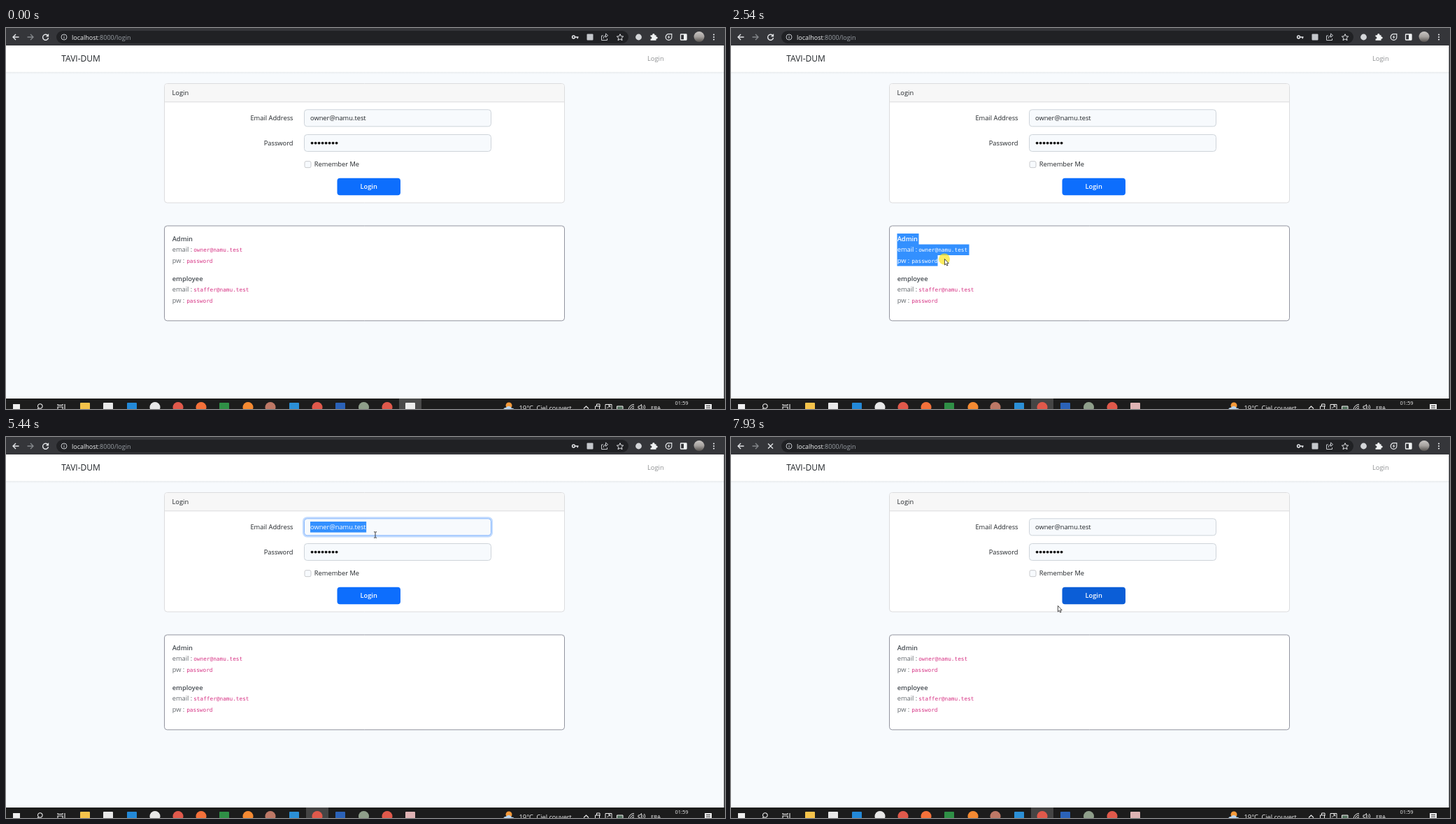
An HTML page with a canvas that plays this animation: 1028 by 545 pixels, repeating every 8000 ms.

```html
<!DOCTYPE html>
<html lang="en">
<head>
<meta charset="utf-8">
<title>Login form demo</title>
<style>
html, body { margin: 0; width: 100%; height: 100%; overflow: hidden; background: #f7fafd; }
canvas { display: block; }
</style>
</head>
<body>
<canvas id="stage" width="1028" height="545"></canvas>
<script>
const ctx = document.getElementById('stage').getContext('2d');
const LOOP = 8000;
const SANS = '"Open Sans", "Noto Sans", sans-serif';
const MONO = '"DejaVu Sans Mono", "Liberation Mono", monospace';
const BODY = '9.3px ' + SANS;
const BOLD = '600 9.3px ' + SANS;
const CODE = '7.75px ' + MONO;
const BLUE = '#3390ff';
const INK = '#212529';
const EMAIL = 'owner@namu.test';

// Stepped mouse moves: start, end, number of steps, [progress, x, y] stops.
const MOVES = [
  { a: 70, b: 520, n: 8, path: [[0, 584, 552], [1, 505, 368]] },
  { a: 730, b: 1520, n: 12, path: [[0, 505, 368], [0.75, 205, 326], [1, 239, 301]] },
  { a: 2320, b: 2750, n: 7, path: [[0, 239, 301], [0.57, 305, 330], [1, 311, 329]] },
  { a: 2950, b: 3010, n: 2, path: [[0, 311, 329], [1, 322, 346]] },
  { a: 3160, b: 3760, n: 10, path: [[0, 322, 346], [0.4, 312, 317], [1, 312, 317]] },
  { a: 3960, b: 4710, n: 12, path: [[0, 312, 317], [1, 525, 131]] },
  { a: 4770, b: 5110, n: 6, path: [[0, 525, 131], [0.7, 525, 131], [1, 528, 139]] },
  { a: 5440, b: 6070, n: 10, path: [[0, 528, 139], [0.1, 528, 140], [0.5, 527, 165], [1, 529, 168]] },
  { a: 6310, b: 6800, n: 8, path: [[0, 529, 168], [0.125, 530, 197], [0.4, 532, 227], [1, 532, 227]] },
  { a: 7790, b: 7930, n: 3, path: [[0, 532, 227], [1, 467, 241]] }
];
const [, , DRAG, , PICK, , FOCUS_EMAIL, FOCUS_PW, SUBMIT] = MOVES;

function progress({ a, b, n }, t) {
  if (t < a) return 0;
  return Math.min(1, (Math.floor((t - a) / (b - a) * (n - 1) + 1e-6) + 1) / n);
}

function along(path, p) {
  const i = Math.max(1, path.findIndex(stop => stop[0] >= p));
  const [p0, x0, y0] = path[i - 1], [p1, x1, y1] = path[i];
  const k = (p - p0) / (p1 - p0);
  return { x: x0 + (x1 - x0) * k, y: y0 + (y1 - y0) * k };
}

function mouseAt(t) {
  const move = MOVES.filter(m => t >= m.a).pop() || MOVES[0];
  return along(move.path, progress(move, t));
}

function stateAt(t) {
  const drag = progress(DRAG, t), pick = progress(PICK, t);
  const email = progress(FOCUS_EMAIL, t), pw = progress(FOCUS_PW, t), submit = progress(SUBMIT, t);
  return {
    mouse: mouseAt(t), drag, submit,
    dragSelect: drag > 0 && pick < 0.5,
    lineSelect: pick >= 0.8 && email === 0,
    emailFocus: email > 0 && pw < 0.5,
    emailSelect: email >= 0.66 && pw < 0.5,
    pwFocus: pw >= 0.5 && submit < 0.6,
    pwSelect: pw >= 0.8 && submit < 0.6,
    caret: t >= 1730 && t < 1792,
    switched: t >= 1792,
    recording: t >= 70,
    hover: submit >= 0.4,
    loading: submit >= 0.75,
    pressed: (t >= 1730 && drag < 0.8) || (pick >= 0.4 && pick < 0.85) ||
      (email > 0 && email < 0.8) || (pw >= 0.5 && pw < 0.9) || (submit >= 0.5 && submit < 0.8)
  };
}

function rect(x, y, w, h, fill) {
  ctx.fillStyle = fill;
  ctx.fillRect(x, y, w, h);
}

function box(x, y, w, h, r, fill, line, lw = 1) {
  ctx.beginPath();
  ctx.roundRect(x, y, w, h, r);
  if (fill) { ctx.fillStyle = fill; ctx.fill(); }
  if (line) { ctx.strokeStyle = line; ctx.lineWidth = lw; ctx.stroke(); }
}

function dot(x, y, r, fill) {
  ctx.beginPath();
  ctx.arc(x, y, r, 0, Math.PI * 2);
  ctx.fillStyle = fill;
  ctx.fill();
}

function text(s, x, y, fill = INK, font = BODY, align = 'left') {
  ctx.font = font;
  ctx.fillStyle = fill;
  ctx.textAlign = align;
  ctx.fillText(s, x, y);
}

// Line icon centred at x, y; fill is optional.
function icon(d, x, y, line, lw = 1.2, fill) {
  const path = new Path2D(d);
  ctx.save();
  ctx.translate(x, y);
  if (fill) { ctx.fillStyle = fill; ctx.fill(path); }
  if (line) { ctx.strokeStyle = line; ctx.lineWidth = lw; ctx.stroke(path); }
  ctx.restore();
}

function drawToolbar(s) {
  const pale = '#e3e5e8', soft = '#c4c7cb';
  rect(0, 0, 1028, 25, '#35363a');
  box(72, 4, 818, 18, 9, '#202124');
  icon('M4.5 0H-4M0 -4L-4 0L0 4', 14, 13, pale, 1.4);
  icon('M-4.5 0H4M0 -4L4 0L0 4', 35, 13, '#85888c', 1.3);
  if (s.loading) icon('M-3.5 -3.5L3.5 3.5M3.5 -3.5L-3.5 3.5', 56.5, 13, pale, 1.4);
  else {
    icon('M3.4 -2A4 4 0 1 0 4 1', 56.5, 13, pale, 1.4);
    icon('M4.6 -5V-.6H.4Z', 56.5, 13, null, 1, pale);
  }
  icon('M4 0A4 4 0 1 1 -4 0A4 4 0 1 1 4 0M0 -.6V2.3M0 -2.4V-1.4', 83, 13, soft, 1);
  text('localhost', 94, 16.5, '#f1f3f4', '9px ' + SANS);
  text(':8000/login', 94 + ctx.measureText('localhost').width, 16.5, '#9aa0a6', '9px ' + SANS);
  icon('M-.6 0A1.9 1.9 0 1 1 -4.4 0A1.9 1.9 0 1 1 -.6 0M-.6 0H4.5M3.2 0V2.2', 814, 13, pale, 1.5);
  box(830.5, 8.5, 9, 9, 1, soft);
  icon('M-2 -2H-4.5V4.5H3.5V2M-2 2Q-1.5 -2 2 -2.3M1.5 -5L4.7 -2.3L1.5 .4Z', 856, 13, soft, 1);
  icon('M0 -4.6L1.4 -1.5L4.7 -1.2L2.2 1L3 4.3L0 2.6L-3 4.3L-2.2 1L-4.7 -1.2L-1.4 -1.5Z', 878, 13.3, pale, 1);
  dot(904.5, 13, 4.4, '#d4d6d9');
  icon('M-4.5 -2.5H-1.8A1.7 1.7 0 1 1 1.4 -2.5H3.5V-.3A1.6 1.6 0 1 1 3.5 2.7V5H-4.5V2.7A1.5 1.5 0 1 0 -4.5 -.2Z', 926, 12.8, null, 1, '#f1f3f4');
  icon('M4.3 0A4.3 4.3 0 1 1 -4.3 0A4.3 4.3 0 0 1 0 -4.3H4.3Z', 947.5, 13, pale, 1.2);
  icon('M1 -3L-2 .6H0L-.8 3L2.2 -.6H.2Z', 947.5, 13, null, 1, pale);
  box(964.5, 9, 8.5, 8, 0.5, null, '#f1f3f4', 1.3);
  rect(969, 9, 4, 8, '#f1f3f4');
  const g = ctx.createLinearGradient(0, 5, 0, 20);
  g.addColorStop(0, '#c9c6c4');
  g.addColorStop(0.5, '#a5a19e');
  g.addColorStop(1, '#55524f');
  dot(991, 12.5, 7.5, g);
  for (let i = -1; i < 2; i++) dot(1012, 13 + i * 3.5, 1.1, pale);
}

function drawField(y, focused) {
  if (focused) box(425.3, y - 1.3, 269.4, 26.6, 5, null, '#c2dbfe', 2.7);
  box(426.5, y, 267, 24, 4, '#f7fafd', focused ? '#86b7fe' : '#ced4da');
}

function drawForm(s) {
  box(226.5, 79.5, 572, 170.5, 4, '#fff', '#dcdcde');
  box(227, 80, 571, 26, [3.5, 3.5, 0, 0], '#f7f7f7');
  rect(227, 105.3, 571, 1, '#dcdcde');
  text('Login', 237.5, 95.5);
  text('Email Address', 410.5, 132, INK, BODY, 'right');
  text('Password', 410.5, 168, INK, BODY, 'right');

  drawField(116.8, s.emailFocus);
  ctx.font = BODY;
  if (s.emailSelect) rect(435, 121, ctx.measureText(EMAIL).width + 0.5, 15.5, BLUE);
  text(EMAIL, 435, 132, s.emailSelect ? '#fff' : INK);

  drawField(152.5, s.pwFocus);
  if (s.pwSelect) rect(435, 156.5, 40.5, 15.5, BLUE);
  for (let i = 0; i < 8; i++) dot(437.6 + i * 5, 164.6, 1.9, s.pwSelect ? '#fff' : '#111');
  if (s.caret) rect(475, 157.5, 1, 13, '#222');

  box(427, 190.7, 9, 9, 2, '#f7fafd', '#c3c5c8', 0.9);
  text('Remember Me', 440.8, 198.4);
  box(473.5, 214.8, 90.5, 24.4, 4, s.hover ? '#0b5ed7' : '#0d6efd');
  text('Login', 518.6, 230.4, '#fff', BOLD, 'center');
}

function drawAccount(name, mail, y, color) {
  text(name, 237.7, y, color || '#454b51', BOLD);
  text('email :', 237.7, y + 15.6, color || '#62676c');
  text(mail, 268.2, y + 15.6, color || '#d63384', CODE);
  text('pw :', 237.7, y + 31.2, color || '#62676c');
  text('password', 258.2, y + 31.2, color || '#d63384', CODE);
}

// Selected rows grow with the drag, then one row is picked on its own.
function selection(s) {
  if (s.lineSelect) return [[237.5, 309.4, 103, 15.6]];
  if (!s.dragSelect) return [];
  if (s.drag < 0.2) return [[237.5, 294, 12, 15.6]];
  const rows = [[237.5, 294, 31, 15.6]];
  if (s.drag < 0.4) return rows.concat([[237.5, 309.4, 28, 15.6]]);
  return rows.concat([[237.5, 309.4, 103, 15.6], [237.5, 325, s.drag < 0.5 ? 45 : 58, 15.6]]);
}

function drawAccounts(s) {
  box(226.5, 283, 572, 135.8, 4, '#fff', '#92949f');
  drawAccount('Admin', EMAIL, 304.8);
  drawAccount('employee', 'staffer@namu.test', 361.8);
  const rows = selection(s);
  if (!rows.length) return;
  ctx.save();
  ctx.beginPath();
  rows.forEach(r => ctx.rect(...r));
  ctx.fillStyle = BLUE;
  ctx.fill();
  ctx.clip();
  drawAccount('Admin', EMAIL, 304.8, '#fff');
  ctx.restore();
}

function drawPage(s) {
  rect(0, 25, 1028, 505, '#f7fafd');
  const g = ctx.createLinearGradient(0, 62.5, 0, 66);
  g.addColorStop(0, '#e6e9eb');
  g.addColorStop(1, '#f7fafd');
  rect(0, 62.5, 1028, 3.5, g);
  rect(0, 25, 1028, 37.8, '#fff');
  text('TAVI-DUM', 79.3, 48, INK, '12px ' + SANS);
  text('Login', 917, 47.3, '#8e9092');
  drawForm(s);
  drawAccounts(s);
  rect(1026.5, 25, 1.5, 505, '#26272a');
}

function drawTaskbar(s) {
  const white = '#f0f0f0';
  rect(0, 530, 1028, 15, '#1c1c1c');
  if (s.switched) rect(429, 530, 32, 15, '#454545');
  else rect(562, 530, 32, 15, s.recording ? '#3b3b3b' : '#4a4a4a');

  box(10, 538, 10, 10, 0, white);
  icon('M3.6 -.5A3.3 3.3 0 1 1 -3 -.5A3.3 3.3 0 1 1 3.6 -.5M-2 2L-4.5 5', 48.5, 541.5, white, 1.1);
  icon('M-5 -4V-2.5H2V-4M-5 5V0H2V5M5 -4V5', 79, 542, white, 1.1);
  const squares = [[113, '#f5c34b'], [146, '#e9e9e9'], [180, '#2389d8'], [312, '#2f8f46'],
    [412, '#2b8fd6'], [478, '#2b62b8'], [578, s.recording ? '#dfb3b4' : '#ececec']];
  squares.forEach(([x, color]) => box(x - 7, 536, 14, 12, 1, color));
  const circles = [[213, '#e8e8e8'], [246, '#e0594b'], [279, '#f4713a'], [346, '#f58a32'],
    [378, '#bd7866'], [445, '#e0594b'], [511.5, '#8f9f8b'], [545, '#e0594b']];
  circles.forEach(([x, color]) => dot(x, 542.5, 7.5, color));

  dot(719, 540, 4.5, '#f49a3a');
  icon('M-8 4A3.5 3.5 0 0 1 -4 0A4.5 4.5 0 0 1 4 1A3 3 0 0 1 8 4Z', 719, 543, null, 1, '#b9d5ef');
  text('19°C', 733.5, 547, white);
  text('Ciel couvert', 758.5, 547, white, '9.2px ' + SANS);
  icon('M-3.5 2L0 -1.5L3.5 2', 829.5, 542.5, white, 1.1);
  icon('M-3 -1H3V5H-3ZM-1 -1V-4H3.5V0', 845.5, 542, white, 1);
  icon('M-4.5 -3.5H4.5V4H-4.5ZM-2 2L2 -2M-.5 -2H2V.5', 861.5, 542, white, 1);
  icon('M-4.5 -1H4V4H-4.5Z', 878, 542, white, 1, '#52705c');
  icon('M-4 4A8 8 0 0 1 4 -4M-1.5 4A5.5 5.5 0 0 1 4 -1.5M1 4A3 3 0 0 1 4 1', 894, 542.5, white, 1);
  icon('M-5 -1.5H-3L-.5 -4V4L-3 1.5H-5ZM1.5 -2Q3 0 1.5 2M3.5 -3.5Q6 0 3.5 3.5', 909, 542.5, white, 0.9);
  text('FRA', 922, 546, white, '8px ' + SANS);
  text('01:59', 966, 539.4, white, '7.5px ' + SANS, 'center');
  icon('M-5 -4H5V4H1L-1 6V4H-5Z', 1004, 542, null, 1, white);
  icon('M-3 -1.5H3M-3 1.2H3', 1004, 542, '#1c1c1c', 0.9);
}

function drawMouse(s) {
  const { x, y } = s.mouse;
  const inside = (l, t, r, b) => x >= l && x <= r && y >= t && y <= b;
  const overField = inside(427, 117, 693, 141) || inside(427, 152, 693, 177);
  const overText = inside(237, 294, 268, 310) || inside(237, 310, 340, 325) || inside(237, 325, 296, 341);
  const overButton = inside(474, 215, 564, 239);
  if (s.pressed) dot(x, y + (overButton ? 4 : 0.5), 8, 'rgba(250, 228, 20, .68)');
  if (overField || overText) {
    const line = s.lineSelect && overText ? '#fff' : '#222';
    icon('M-2 -4.2H-.5L0 -3.7L.5 -4.2H2M0 -3.7V3.7M-2 4.2H-.5L0 3.7L.5 4.2H2', x, y, line, 0.9);
  } else if (overButton) {
    icon('M-1 6V1Q0 -.3 1 1V4.5L5.5 5.5Q7 6 6.5 8L5.5 12H0L-3.5 8Q-3.5 6.5 -1 8Z', x, y, '#222', 0.8, '#fff');
  } else {
    icon('M.4 .4V9L2.3 7.2L3.6 10L5 9.4L3.8 6.6H6.2Z', x, y, '#222', 0.8, '#fff');
  }
}

function draw(t) {
  const s = stateAt(t);
  drawPage(s);
  drawToolbar(s);
  drawTaskbar(s);
  drawMouse(s);
}

const start = performance.now();
function tick() {
  draw((performance.now() - start) % LOOP);
  requestAnimationFrame(tick);
}
tick();
</script>
</body>
</html>
```
